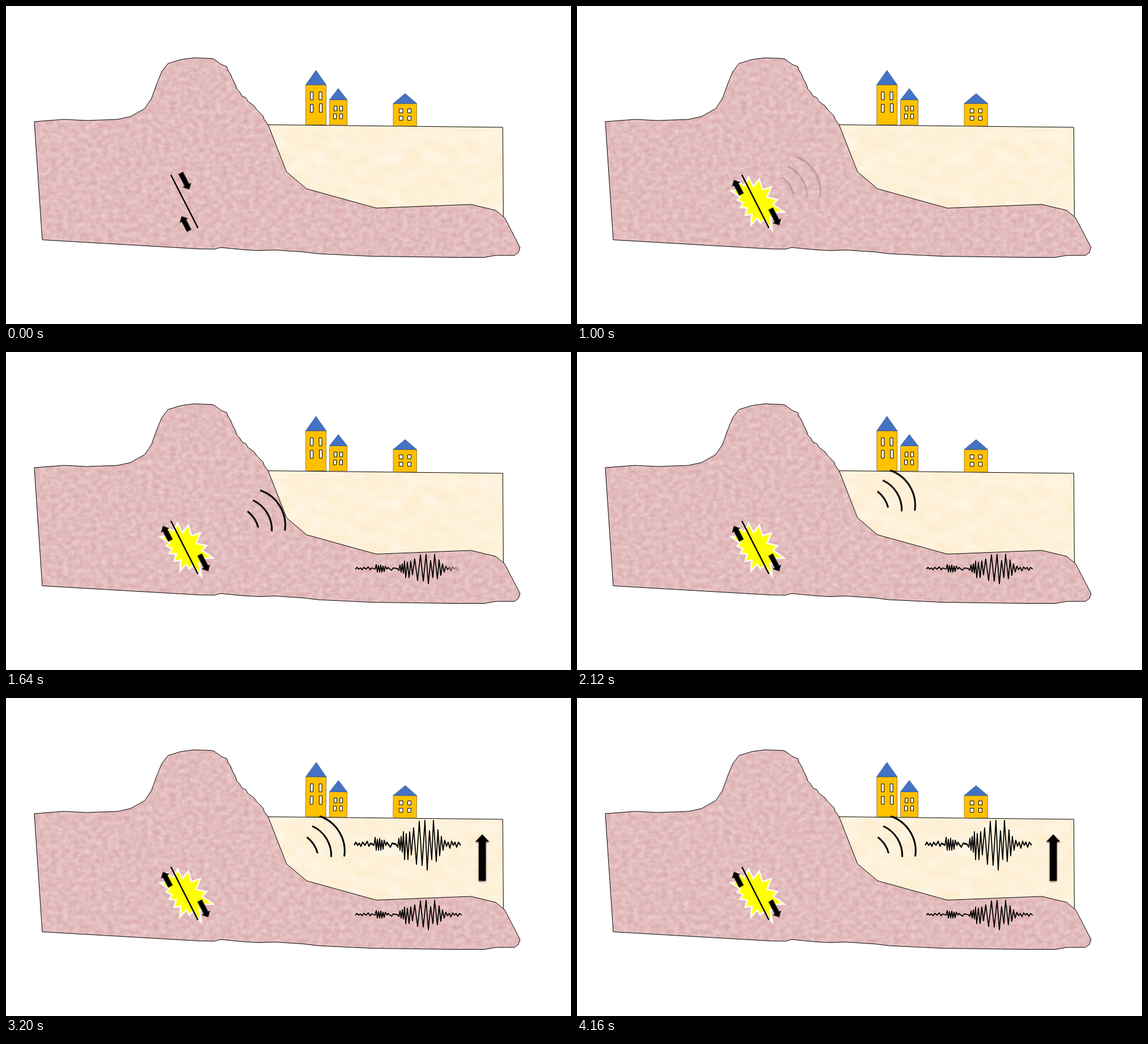
Write an HTML page that moves like this. It is 998 by 561 pixels and loops after 4200 ms.

```html
<!DOCTYPE html>
<html lang="en">
<head>
<meta charset="utf-8">
<title>Seismic waves in a basin</title>
<style>
  html, body { margin: 0; width: 100%; height: 100%; overflow: hidden; background: #fff; }
  svg { display: block; width: 998px; height: 561px; }

  .outline { fill: none; stroke: #000; stroke-width: 1; }
  .walls { fill: #ffc000; stroke: #7f6a35; stroke-width: .8; }
  .roof { fill: #4472c4; stroke: #2f528f; stroke-width: .8; }
  .window { fill: #fff; stroke: #000; stroke-width: 1; }
  .trace { fill: none; stroke: #000; stroke-width: 1.8; stroke-linejoin: round; vector-effect: non-scaling-stroke; }
  .arcs { fill: none; stroke: #000; stroke-width: 3; }

  .anim { animation: 4200ms linear infinite; }
  #slipDown { --dx: 33.5px; --dy: 63px; animation-name: slip; }
  #slipUp { --dx: -33px; --dy: -64px; animation-name: slip; }
  #burst { animation-name: burst; }
  #fadeIn { animation-name: fadeIn; }
  #travel { animation-name: travel; }
  #wipeRock { animation-name: wipeRock; }
  #wipeBasin { animation-name: wipeBasin; }
  #wipeUp { animation-name: wipeUp; }
  .house { transform-box: fill-box; transform-origin: center; animation-name: teeter; }

  /* quadratic acceleration, then quadratic deceleration */
  @keyframes slip {
    0% { transform: none; animation-timing-function: cubic-bezier(.3333, 0, .6667, .3333); }
    11.19% { transform: translate(calc(var(--dx) / 2), calc(var(--dy) / 2)); animation-timing-function: cubic-bezier(.3333, .6667, .6667, 1); }
    22.381%, 100% { transform: translate(var(--dx), var(--dy)); }
  }
  @keyframes burst {
    0% { opacity: 0; animation-timing-function: step-end; }
    22.381%, 100% { opacity: 1; }
  }
  @keyframes fadeIn {
    0%, 22.9% { opacity: 0; }
    28.571%, 100% { opacity: 1; }
  }
  @keyframes travel {
    0%, 29.405% { transform: translate(-168.5px, 57px); animation-timing-function: cubic-bezier(.3333, 0, .6667, .3333); }
    40.536% { transform: translate(-84.25px, 28.5px); animation-timing-function: cubic-bezier(.3333, .6667, .6667, 1); }
    51.667%, 100% { transform: translate(0, 0); }
  }
  @keyframes wipeRock {
    0%, 28.81% { transform: translateX(0); }
    40.714%, 100% { transform: translateX(220px); }
  }
  @keyframes wipeBasin {
    0%, 51.667% { transform: translateX(0); }
    63.571%, 100% { transform: translateX(220px); }
  }
  @keyframes wipeUp {
    0%, 51.667% { transform: translateY(0); }
    63.571%, 100% { transform: translateY(-106px); }
  }
  @keyframes teeter {
    0%, 51.667%, 75.476%, 99.286%, 100% { transform: rotate(0deg); }
    54.048%, 56.429%, 65.952%, 77.857%, 80.238%, 89.762% { transform: rotate(2deg); }
    61.19%, 70.714%, 85%, 94.524% { transform: rotate(-2deg); }
  }
</style>
</head>
<body>
<svg viewBox="0 0 998 561" xmlns="http://www.w3.org/2000/svg">
  <defs>
    <path id="rockShape" d="M50 204 102 200 143 202 197 200 220 195 245 181 257 163 266 138 275 116 286 101.500 309 94.500 331 91.500 363 92.500 368 94 380 103 390 107 392 113 397 121 400 129 405 138 408 147 413 152 417 159 424 162 427 168 438 176 443 183 454 194 456 200 463 209.500 495.500 292.500 531 322.500 654 356.500 821 350 865 360.500 881 374 908 426 905 435 898 440 865 440 845 443.500 790 443.500 645 441.500 551 437 527 434 475 430.500 447 431.500 420 430 379 426 368 429 340 428.500 64 412.500Z"/>
    <path id="basinShape" d="M463 209.500 877.500 214 878.500 372 865 360.500 821 350 654 356.500 531 322.500 495.500 292.500Z"/>
    <polyline id="quake" points="0,1 3,-2 6,1 9,-1 12,2 15,-2 19,1 23,-3 26,2 29,-1 32,0 35,1 37,-7 39,6 41,-5 43,6 45,-6 47,6 49,-4 51,5 53,-4 56,1 58,-2 60,0 64,3 67,-1 74,0 77,3 79,-6 81,6 83,-8 85,8 87,-13 89,16 92,-11 95,16 98,-13 101,11 105,-17 110,21 115,-24 120,22 125,-25 129,27 133,-14 137,16 140,-25 145,18 148,-15 151,12 154,-8 157,6 160,-4 163,2 166,-2 169,4 172,-3 175,1 178,-2 181,3 184,-2 188,1"/>

    <filter id="granite" x="0" y="0" width="1" height="1" color-interpolation-filters="sRGB">
      <feTurbulence type="fractalNoise" baseFrequency=".1 .12" numOctaves="4" seed="7"/>
      <feColorMatrix values="0 0 0 .1 .84  0 0 0 .2 .635  0 0 0 .18 .65  0 0 0 0 1"/>
      <feComposite in2="SourceGraphic" operator="in"/>
    </filter>
    <filter id="parchment" x="0" y="0" width="1" height="1" color-interpolation-filters="sRGB">
      <feTurbulence type="fractalNoise" baseFrequency=".03 .05" numOctaves="3" seed="3"/>
      <feColorMatrix values="0 0 0 0 .997  0 0 0 .05 .92  0 0 0 .14 .78  0 0 0 0 1"/>
      <feComposite in2="SourceGraphic" operator="in"/>
    </filter>
    <filter id="shadow" x="-.4" y="-.1" width="1.8" height="1.3">
      <feDropShadow dx="0" dy="1.5" stdDeviation="1.6" flood-opacity=".6"/>
    </filter>

    <linearGradient id="softRight">
      <stop offset=".88" stop-color="#fff"/>
      <stop offset="1" stop-color="#fff" stop-opacity="0"/>
    </linearGradient>
    <linearGradient id="softTop" x2="0" y2="1">
      <stop offset="0" stop-color="#fff" stop-opacity="0"/>
      <stop offset=".1" stop-color="#fff"/>
    </linearGradient>
    <mask id="rockMask" maskUnits="userSpaceOnUse" x="600" y="340" width="220" height="90">
      <rect id="wipeRock" class="anim" x="365" y="340" width="250" height="90" fill="url(#softRight)"/>
    </mask>
    <mask id="basinMask" maskUnits="userSpaceOnUse" x="600" y="200" width="220" height="120">
      <rect id="wipeBasin" class="anim" x="365" y="200" width="250" height="120" fill="url(#softRight)"/>
    </mask>
    <mask id="upMask" maskUnits="userSpaceOnUse" x="815" y="225" width="52" height="115">
      <rect id="wipeUp" class="anim" x="815" y="329" width="52" height="140" fill="url(#softTop)"/>
    </mask>
  </defs>

  <use href="#rockShape" filter="url(#granite)"/>
  <use href="#basinShape" filter="url(#parchment)"/>
  <use href="#rockShape" class="outline"/>
  <path class="outline" d="M463 209.500 877.500 214 878.500 372"/>

  <g class="house anim">
    <path class="walls" d="M529.500 139h36v70.500h-36z"/>
    <path class="roof" d="M529.500 139 547.500 113.500 565.500 139z"/>
    <path class="window" d="M537.500 151.500h5v14h-5zM553 151.500h5v14h-5zM537.500 173.500h5v14h-5zM553.500 172.500h5v15h-5z"/>
  </g>
  <g class="house anim">
    <path class="walls" d="M571.500 165.500h31v44.500h-31z"/>
    <path class="roof" d="M571.500 165.500 587 145.500 602.500 165.500z"/>
    <path class="window" d="M579.500 176.500h5v8.500h-5zM589.500 176.500h5v8.500h-5zM578.500 190.500h5v8.500h-5zM589.500 190.500h5v8.500h-5z"/>
  </g>
  <g class="house anim">
    <path class="walls" d="M684 172h41.500v39.500h-41.500z"/>
    <path class="roof" d="M684 172 705 154.500 725.500 172z"/>
    <path class="window" d="M694.500 181.500h6.500v7h-6.500zM709.500 181.500h6v7h-6zM694.500 194.500h6.500v7h-6.500zM709.500 194.500h6v7h-6z"/>
  </g>

  <g id="burst" class="anim">
    <path transform="matrix(.0008 .00445 -.00397 .0003 354.200 297.700)" vector-effect="non-scaling-stroke"
      fill="#ff0" stroke="#fff" stroke-width="2.6" stroke-miterlimit="8"
      d="M11462 4342 14790 0 14525 5777 18007 3172 16380 6532 21600 6645 16985 9402 18270 11290 16380 12310 18877 15632 14640 14350 14942 17370 12180 15935 11612 18842 9872 17370 8700 19712 7527 18125 4917 21600 4805 18240 1285 17825 3330 15370 0 12877 3935 11592 1172 8270 5372 7817 4502 3625 8550 6382 9722 1887Z"/>
  </g>
  <path d="M291.300 298 339 391.500" stroke="#000" stroke-width="2.5"/>
  <g id="slipDown" class="anim">
    <path transform="translate(308.500 294.500) rotate(62.500)" d="M0-4.500H24V-8.500L33 0 24 8.500V4.500H0z"/>
  </g>
  <g id="slipUp" class="anim">
    <path transform="translate(323.500 396.500) rotate(-117.500)" d="M0-4.500H20V-8.500L29 0 20 8.500V4.500H0z"/>
  </g>

  <g id="fadeIn" class="anim">
    <g id="travel" class="anim arcs">
      <path d="M554 208.500A65 65 0 0 1 597.500 279.500"/>
      <path d="M541 226A57 57 0 0 1 574.500 280.500"/>
      <path d="M531.500 245.500A52 52 0 0 1 550.500 274"/>
    </g>
  </g>

  <g mask="url(#rockMask)">
    <use href="#quake" class="trace" transform="translate(617 382)"/>
  </g>
  <g mask="url(#basinMask)">
    <use href="#quake" class="trace" transform="translate(615 258) scale(1 1.670)"/>
  </g>
  <g mask="url(#upMask)">
    <path filter="url(#shadow)" d="M835 322.500V253.500H829L841.300 240.500 853.500 253.500H847.500V322.500z"/>
  </g>
</svg>
</body>
</html>
```
